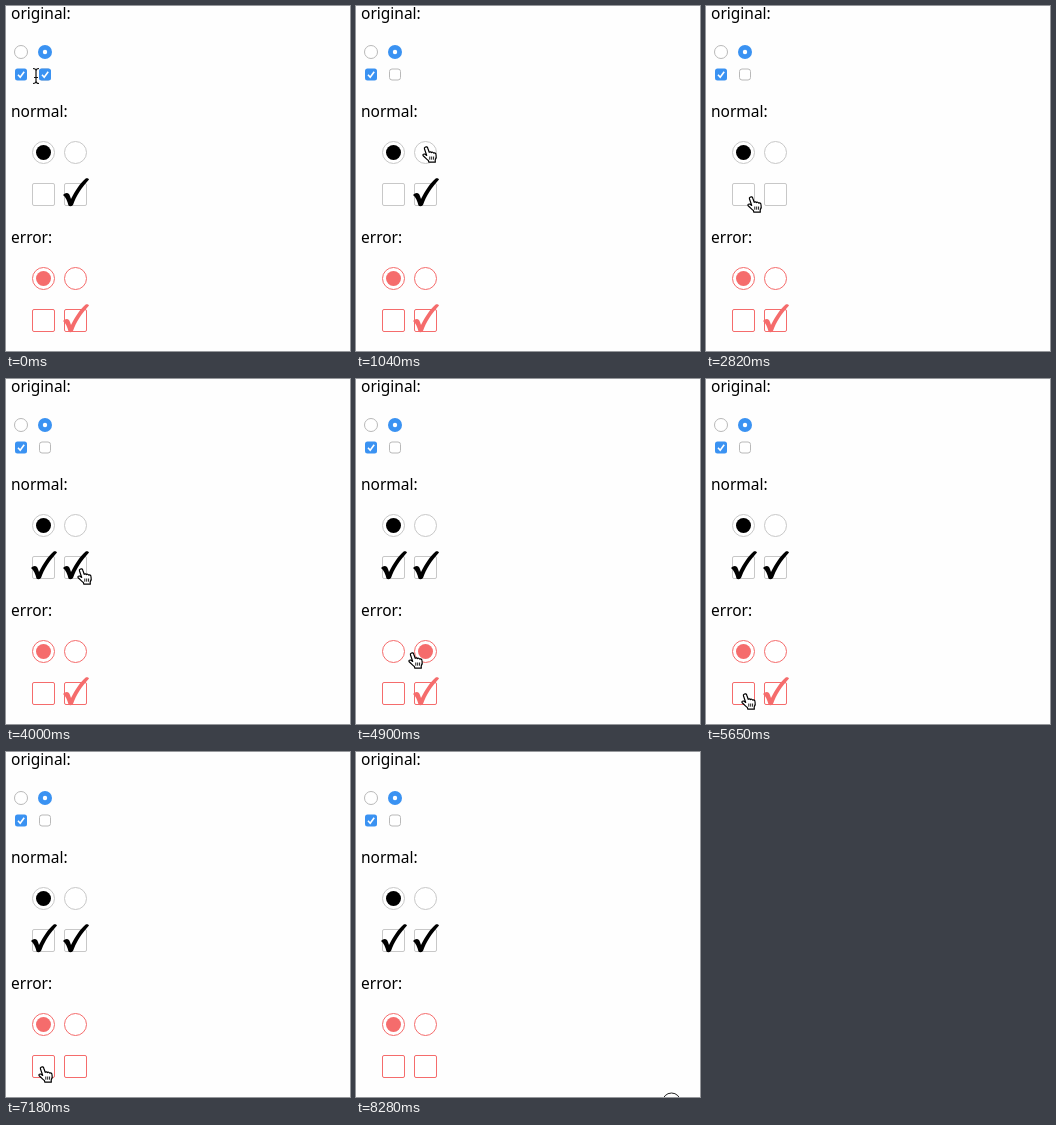
Recreate the animation shown at these times as an HTML page. Size 344 by 345 pixels, loop 8.38 s.

```html
<!DOCTYPE html>
<html lang="en">
<head>
<meta charset="utf-8">
<title>Radio and checkbox styles</title>
<style>
  html, body { margin: 0; width: 100%; height: 100%; overflow: hidden; background: #fefefe; }
  svg { display: block; width: 344px; height: 345px; }
  text { font: 15.5px "Noto Sans", "Open Sans", sans-serif; fill: #000; }
  .normal { --line: #c8c8c8; --mark: #000; }
  .error { --line: #f56c6c; --mark: #f56c6c; }
  .box { fill: #fff; stroke: var(--line); }
  .mark { fill: var(--mark); }
  .native { fill: #fff; stroke: #b9b9b9; }
  .blue { fill: #3a92f2; }
  .tick { fill: none; stroke: #fff; stroke-width: 1.6; }
</style>
</head>
<body>
<svg viewBox="0 0 344 345">
  <defs>
    <path id="check" d="M-13 .5C-11-1.5-9-2.5-7-.5C-6 1.5-5.5 2.5-5 4.5C-1-3.5 4-11.5 10-16.3C11.5-16.5 12.6-16 13-15C6-7.5 0 1.500-3 10.500C-4.500 12-6.500 12-7.500 11C-8.500 6.500-10.500 2.500-13 .5Z"/>
    <g id="blueCheck">
      <rect class="blue" width="12" height="12" rx="2.5"/>
      <path class="tick" d="M3 6.300L5.200 8.700L9.200 3.200"/>
    </g>
  </defs>

  <text x="5" y="13">original:</text>
  <circle class="native" cx="15" cy="46" r="6.5"/>
  <circle class="blue" cx="39" cy="46" r="7"/>
  <circle cx="39" cy="46" r="2.2" fill="#fff"/>
  <use href="#blueCheck" x="9" y="62.500"/>
  <rect class="native" x="33.500" y="63" width="11" height="11" rx="2.500"/>
  <use id="nativeCheck" href="#blueCheck" x="33" y="62.500"/>

  <text x="5" y="111">normal:</text>
  <g id="normal" class="normal" transform="translate(0 146.500)"></g>
  <text x="5" y="237">error:</text>
  <g id="error" class="error" transform="translate(0 272.500)"></g>

  <path id="ring" d="M306.500 350a9 9 0 0 1 18 0" fill="none" stroke="#222"/>

  <g id="cursor">
    <g id="beam" fill="none">
      <path d="M-3-7.500Q0-7.500 0-5Q0-7.500 3-7.500M0-5V5M-3 7.500Q0 7.500 0 5Q0 7.500 3 7.500M-2 1.500H2" stroke="#111" stroke-width="1.200"/>
    </g>
    <path id="arrow" d="M.5 .5V14.500L3.700 11.400L5.900 16.700L8.100 15.800L5.900 10.600H10.300Z" fill="#000" stroke="#fff"/>
    <g id="hand" stroke="#000" stroke-linejoin="round">
      <path fill="#fff" stroke-width="1.200" d="M3 1.200C4.300 .4 5.400 .9 5.800 2.200L7.200 6.300C7.800 5.600 9 5.700 9.500 6.600C10.100 6 11.300 6.100 11.700 7.100C12.800 6.600 13.800 7.200 14 8.400C14.500 10.500 14.400 12.400 13.200 14L13.300 16.200H6.900L6.400 14.600C4.600 13.300 3 11.200 1.200 9.800C.4 8.800 1.400 7.700 2.700 8.100L4.700 9.400L2.500 3C2.200 2.200 2.400 1.500 3 1.200Z"/>
      <path stroke-width=".9" d="M7.800 10.500V13.700M9.700 10.500V13.700M11.600 10.500V13.700"/>
    </g>
  </g>
</svg>
<script>
const LOOP = 8380, STEP = 148.2, FADE = 250;
const $ = id => document.getElementById(id);

// Each control: starting state, then the times at which it flips.
const controls = [];
function addGroup(id, radio1, radio2, check1, check2) {
  const add = (x, y, box, mark, [on, ...flips]) => {
    $(id).insertAdjacentHTML('beforeend',
      `<g transform="translate(${x} ${y})">${box}<g class="mark">${mark}</g></g>`);
    controls.push({ el: $(id).lastElementChild.lastElementChild, on, flips });
  };
  const ring = '<circle class="box" r="11"/>', dot = '<circle r="7.5"/>';
  const square = '<rect class="box" x="-11" y="-11" width="22" height="22" rx="1.5"/>';
  const check = '<use href="#check"/>';
  add(37.5, 0, ring, dot, radio1);
  add(69.5, 0, ring, dot, radio2);
  add(37.5, 42, square, '', [0]);
  add(69.5, 42, square, '', [0]);
  add(38, 42, '', check, check1);
  add(70, 42, '', check, check2);
}
addGroup('normal', [1, 1250, 1777], [0, 1250, 1777], [0, 3030], [1, 2440, 3630]);
addGroup('error', [1, 4500, 5060], [0, 4500, 5060], [0, 5780, 6850], [1, 6180]);

// Cursor stops: step, shape, x, y
const path = [
  [0, 'beam', 30, 70], [1, 'arrow', 35, 59], [2, 'arrow', 36, 67], [3, 'arrow', 36, 69],
  [4, 'arrow', 36, 69], [5, 'arrow', 40, 78], [7, 'hand', 66, 140], [8, 'hand', 69, 149],
  [10, 'hand', 69, 149], [12, 'hand', 36, 146], [13, 'hand', 34, 145], [14, 'hand', 34, 145],
  [16, 'hand', 64, 183], [17, 'hand', 70, 189], [18, 'hand', 66, 190], [19, 'hand', 41, 190],
  [21, 'hand', 34, 190], [23, 'hand', 34, 190], [25, 'hand', 70, 190], [27, 'hand', 71, 189],
  [28, 'hand', 69, 205], [30, 'hand', 67, 268], [31, 'hand', 68, 273], [32, 'hand', 68, 273],
  [34, 'hand', 35, 272], [35, 'hand', 35, 272], [37, 'hand', 35, 310], [38, 'hand', 35, 314],
  [40, 'hand', 35, 315], [42, 'hand', 72, 315], [43, 'hand', 73, 315], [44, 'hand', 69, 314],
  [46, 'hand', 36, 314], [48, 'hand', 32, 314], [50, 'arrow', 110, 322], [51, 'arrow', 213, 336]
];

const lerp = (a, b, p) => a + (b - a) * p;
const ease = p => p * p * (3 - 2 * p);
const show = (id, on) => { $(id).style.display = on ? '' : 'none'; };

function level({ on, flips }, t) {
  let v = on, target = on;
  for (const at of flips) {
    if (t < at) break;
    target = 1 - target;
    v = lerp(v, target, ease(Math.min(1, (t - at) / FADE)));
  }
  return v;
}

function drawCursor(step) {
  show('cursor', step < 52);
  if (step >= 52) return;
  const i = path.findLastIndex(p => p[0] <= step);
  const a = path[i], b = path[i + 1] || a;
  const p = b === a ? 0 : (step - a[0]) / (b[0] - a[0]);
  $('cursor').setAttribute('transform',
    `translate(${Math.round(lerp(a[2], b[2], p))} ${Math.round(lerp(a[3], b[3], p))})`);
  for (const shape of ['beam', 'arrow', 'hand']) show(shape, shape === a[1]);
}

function render(t) {
  const step = Math.floor((t + 6) / STEP);
  for (const c of controls) {
    const v = level(c, step * STEP);
    c.el.setAttribute('transform', `scale(${v})`);
    c.el.setAttribute('opacity', v);
  }
  show('nativeCheck', step < 2);
  show('ring', t >= 8280);
  drawCursor(step);
}

const start = performance.now();
function frame() {
  render((performance.now() - start) % LOOP);
  requestAnimationFrame(frame);
}
frame();
</script>
</body>
</html>
```
